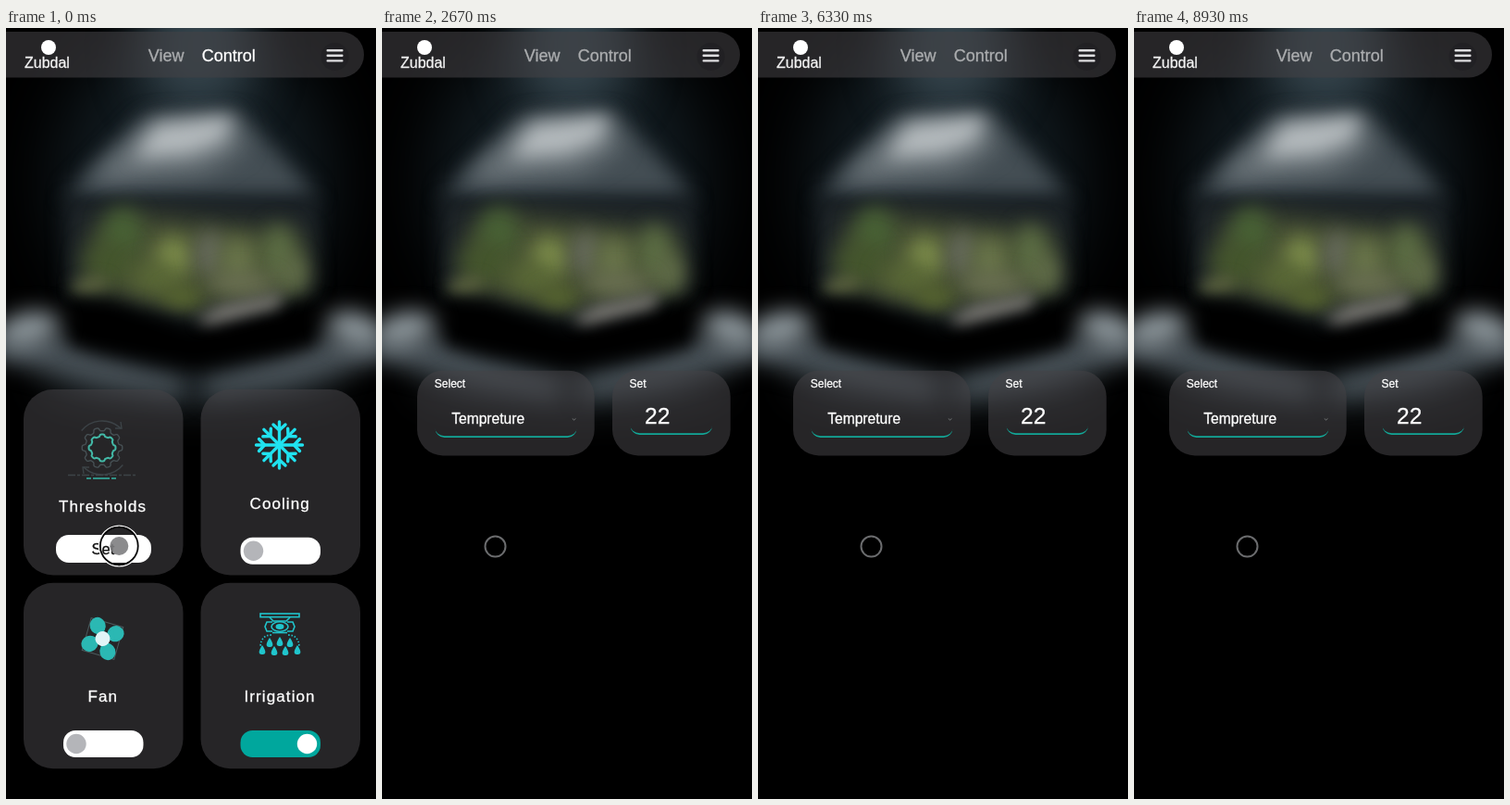
An HTML page with a canvas for the animation above (9 s loop, 400 px wide and 832 px high).

```html
<!DOCTYPE html>
<html lang="en">
<head>
<meta charset="utf-8">
<title>Greenhouse control</title>
<style>
  html, body { margin: 0; width: 100%; height: 100%; overflow: hidden; background: #000; }
  canvas { display: block; width: 100%; height: 100%; }
</style>
</head>
<body>
<canvas id="stage" width="400" height="832"></canvas>
<script>
const W = 400, H = 832, LOOP = 9000, PAGE_CHANGE = 1270;
const FONT = '"Liberation Sans", Arial, sans-serif';
const TEAL = '#2bb8b3', CYAN = '#20e2ef', GLASS = 'rgba(68,65,70,0.57)', MUTED = '#abadaf';
const ctx = document.getElementById('stage').getContext('2d');

function layer(paint) {
  const c = document.createElement('canvas');
  c.width = W;
  c.height = H;
  paint(c.getContext('2d'));
  return c;
}

function fillBox(g, x, y, w, h, r, color) {
  g.fillStyle = color;
  g.beginPath();
  g.roundRect(x, y, w, h, r);
  g.fill();
}

function disc(g, x, y, r, color) {
  g.fillStyle = color;
  g.beginPath();
  g.arc(x, y, r, 0, Math.PI * 2);
  g.fill();
}

function ring(g, x, y, r, color, width) {
  g.strokeStyle = color;
  g.lineWidth = width;
  g.beginPath();
  g.arc(x, y, r, 0, Math.PI * 2);
  g.stroke();
}

function line(g, ...p) {
  g.beginPath();
  for (let i = 0; i < p.length; i += 2) g.lineTo(p[i], p[i + 1]);
  g.stroke();
}

function label(g, text, x, y, size, color, spacing = 0) {
  g.font = `${size}px ${FONT}`;
  g.letterSpacing = spacing + 'px';
  g.fillStyle = g.strokeStyle = color;
  g.lineWidth = 0.3;
  g.fillText(text, x, y);
  g.strokeText(text, x, y);
}

// Soft-focus greenhouse
function paintScene(g) {
  const poly = (color, blur, ...p) => {
    g.filter = `blur(${blur}px)`;
    g.fillStyle = color;
    g.beginPath();
    for (let i = 0; i < p.length; i += 2) g.lineTo(p[i], p[i + 1]);
    g.fill();
  };
  const blob = (color, blur, x, y, rx, ry, turn = 0) => {
    g.filter = `blur(${blur}px)`;
    g.fillStyle = color;
    g.beginPath();
    g.ellipse(x, y, rx, ry, turn, 0, Math.PI * 2);
    g.fill();
  };
  g.fillStyle = '#000';
  g.fillRect(0, 0, W, H);
  blob('#111a1f', 36, 203, 165, 150, 165);
  blob('#34434b', 26, 207, 20, 62, 75);

  // floor and its side lights
  blob('#20272b', 20, 203, 378, 165, 32);
  poly('#485157', 12, -20, 330, 60, 330, 105, 352, 190, 378, 190, 400, 110, 388, -20, 356);
  poly('#485157', 12, 420, 330, 345, 330, 300, 352, 216, 378, 216, 400, 300, 388, 420, 356);

  // roof
  poly('#444e54', 11, 148, 96, 257, 94, 338, 182, 62, 182);
  poly('#6d767b', 12, 160, 98, 245, 95, 258, 130, 215, 155, 88, 166);
  poly('#b4babd', 10, 162, 105, 247, 95, 234, 122, 198, 136, 138, 140);

  // walls and plants
  poly('#1d2327', 10, 64, 186, 338, 186, 333, 285, 207, 322, 66, 288);
  poly('#464f33', 14, 95, 212, 140, 200, 320, 222, 328, 282, 205, 304, 85, 284);
  blob('#486235', 11, 126, 220, 20, 26);
  blob('#44562c', 12, 112, 252, 28, 20);
  blob('#7f8f4c', 11, 181, 247, 20, 22);
  blob('#5a6936', 12, 162, 270, 28, 18);
  blob('#64685a', 10, 220, 243, 16, 25);
  blob('#69754a', 11, 251, 250, 20, 25);
  blob('#5d6f45', 11, 295, 242, 16, 30);
  blob('#616d49', 10, 310, 265, 14, 20);
  blob('#646b43', 8, 90, 278, 20, 7, -.15);
  blob('#55632f', 9, 190, 290, 22, 12);
  blob('#6b7053', 10, 255, 276, 38, 12);

  // planter and its lit edge
  poly('#000', 10, 62, 298, 110, 294, 200, 324, 340, 298, 334, 342, 204, 370, 70, 342);
  poly('#86837e', 8, 206, 315, 234, 300, 300, 287, 294, 301, 218, 320);

  blob('#8d979c', 12, 24, 325, 34, 18, -.25);
  blob('#8d979c', 12, 378, 325, 32, 18, .3);
  g.filter = 'none';
}

function paintHeader(g, activeColor) {
  fillBox(g, -40, 4, 427, 49.5, 25, GLASS);
  disc(g, 46, 21, 8, '#fff');
  label(g, 'Zubdal', 20, 43, 16, '#f2f2f2');
  label(g, 'View', 153.7, 35.7, 18, MUTED);
  label(g, 'Control', 211.7, 35.7, 18, activeColor);
  disc(g, 355.5, 31, 15, 'rgba(20,20,22,0.22)');
  for (const y of [23, 28.6, 34.2]) fillBox(g, 346.5, y, 18, 2.4, 1, '#dedee0');
}

function paintGear(g) {
  g.save();
  g.translate(104, 453);
  const cog = (r, depth, teeth) => {
    g.beginPath();
    for (let i = 0; i <= 180; i++) {
      const a = i / 180 * Math.PI * 2;
      const d = r + depth * Math.tanh(2.5 * Math.cos(a * teeth));
      g.lineTo(d * Math.cos(a), d * Math.sin(a));
    }
    g.stroke();
  };
  g.strokeStyle = '#465054';
  g.lineWidth = 1.4;
  cog(20, 1.8, 10);
  g.strokeStyle = '#43b9a7';
  g.lineWidth = 2;
  cog(13.4, 1.1, 8);
  g.strokeStyle = '#3c4347';
  g.lineWidth = 1.4;
  for (const turn of [0, Math.PI]) {
    g.save();
    g.rotate(turn);
    g.beginPath();
    g.arc(0, 0, 29, -2.45, -0.8);
    g.stroke();
    line(g, 20, -28, 21, -21, 14, -21);
    g.restore();
  }
  g.setLineDash([8, 2, 3, 2]);
  line(g, -37, 29.5, 37, 29.5);
  g.strokeStyle = '#35b7a6';
  g.setLineDash([5, 2, 18, 2]);
  line(g, -17, 33, 17, 33);
  g.restore();
}

function paintSnowflake(g) {
  g.save();
  g.translate(295.5, 450);
  g.strokeStyle = CYAN;
  g.lineWidth = 3.4;
  g.lineCap = g.lineJoin = 'round';
  for (let i = 0; i < 8; i++) {
    const tip = i % 2 ? 23.5 : 25;
    line(g, 0, 0, 0, -tip);
    if (i % 2) line(g, -6, -19, 0, -13.5, 6, -19);
    else line(g, -6.5, -22, 0, -16, 6.5, -22);
    g.rotate(Math.PI / 4);
  }
  g.restore();
}

function paintFan(g) {
  g.save();
  g.translate(104.5, 659);
  g.rotate(0.28);
  g.strokeStyle = '#4b5a5d';
  g.lineWidth = 1;
  g.strokeRect(-18, -18, 36, 36);
  for (let i = 0; i < 4; i++) {
    g.fillStyle = TEAL;
    g.beginPath();
    g.ellipse(-9, -12, 8.5, 9.2, -0.6, 0, Math.PI * 2);
    g.fill();
    g.beginPath();
    g.moveTo(-16, -8);
    g.lineTo(0, 0);
    g.lineTo(-1, -13);
    g.fill();
    g.rotate(Math.PI / 2);
  }
  disc(g, 0, 0, 8, '#e2f5f7');
  g.restore();
}

function paintSprinkler(g) {
  g.save();
  g.translate(296, 0);
  g.strokeStyle = g.fillStyle = '#20c5cc';
  g.lineWidth = 1.6;
  g.strokeRect(-21, 632, 42, 3.6);
  line(g, -11, 636, -7, 640, 7, 640, 11, 636);
  g.beginPath();
  g.ellipse(0, 646, 9, 5.2, 0, 0, Math.PI * 2);
  g.stroke();
  g.beginPath();
  g.ellipse(0, 646, 4.5, 3, 0, 0, Math.PI * 2);
  g.fill();
  line(g, -8, 652.5, 8, 652.5);
  for (const side of [-1, 1]) {
    line(g, side * 8, 641, side * 14, 641, side * 16, 646, side * 14, 651, side * 8, 651);
    g.setLineDash([1.6, 1.8]);
    g.beginPath();
    g.moveTo(side * 9, 655);
    g.quadraticCurveTo(side * 20, 655, side * 21, 667);
    g.stroke();
    g.setLineDash([]);
  }
  for (const [x, y] of [[-19, 672], [-11, 664], [-6, 673], [0, 663], [6, 673], [11, 664], [19, 672]]) {
    g.beginPath();
    g.moveTo(x, y - 6);
    g.bezierCurveTo(x + 6, y + 3, x + 2.5, y + 4, x, y + 4);
    g.bezierCurveTo(x - 2.5, y + 4, x - 6, y + 3, x, y - 6);
    g.fill();
  }
  g.restore();
}

function paintSwitch(g, x, y, on) {
  fillBox(g, x, y, 86.5, 29, 13, on ? '#00a79d' : '#fff');
  disc(g, x + (on ? 72 : 14), y + 14.5, 10.7, on ? '#fff' : '#b4b5b9');
}

function paintControls(g) {
  g.drawImage(scene, 0, 0);
  paintHeader(g, '#fff');
  for (const x of [19, 210.5])
    for (const y of [390, 598.7]) fillBox(g, x, y, 172.5, 200.5, 32, GLASS);
  paintGear(g);
  paintSnowflake(g);
  paintFan(g);
  paintSprinkler(g);
  label(g, 'Thresholds', 57, 522, 17, '#fff', 1.1);
  label(g, 'Cooling', 263.5, 519, 17, '#fff', 1.1);
  label(g, 'Fan', 88.5, 727, 17, '#fff', 1.1);
  label(g, 'Irrigation', 257.5, 727, 17, '#fff', 1.1);
  fillBox(g, 54, 547, 103, 30, 14, '#fff');
  label(g, 'Set', 92.5, 567.5, 16.5, '#111');
  paintSwitch(g, 253.5, 549.8, false);
  paintSwitch(g, 62, 758, false);
  paintSwitch(g, 253.5, 758, true);
}

// Bottom border that thins out around rounded corners
function underline(g, x, y, w) {
  const r = 10, t = 1.8, q = Math.PI / 2;
  g.fillStyle = '#12a797';
  g.beginPath();
  g.arc(x + w - r, y - r, r, 0, q);
  g.arc(x + r, y - r, r, q, 2 * q);
  g.ellipse(x + r, y - r, r, r - t, 0, 2 * q, q, true);
  g.ellipse(x + w - r, y - r, r, r - t, 0, q, 0, true);
  g.fill();
}

function paintThresholds(g) {
  g.drawImage(scene, 0, 0);
  paintHeader(g, MUTED);
  fillBox(g, 38, 369.7, 191.7, 91.7, 28, GLASS);
  fillBox(g, 249, 369.7, 127.7, 91.7, 28, GLASS);
  label(g, 'Select', 56.8, 388, 12, '#fff');
  label(g, 'Set', 267.6, 388, 12, '#fff');
  label(g, 'Tempreture', 75.2, 427, 15.6, '#fff');
  label(g, '22', 284, 427, 24.5, '#fff');
  underline(g, 57.5, 442, 153);
  underline(g, 268.5, 439, 88.5);
  g.strokeStyle = '#77797b';
  g.lineWidth = 1;
  line(g, 205.8, 421.5, 207.6, 423, 209.4, 421.5);
}

function paintPointer(g, t) {
  const p = Math.min(t / 450, 1);
  const ease = 1 - (1 - p) ** 3;
  const press = 1 - ease;
  if (press > 0) {
    const r = 11 + 11 * press;
    g.globalAlpha = press;
    disc(g, 122.3, 559, 10, 'rgba(125,125,128,0.9)');
    ring(g, 122.3, 559, r, '#fff', 1.3);
    ring(g, 122.3, 559, r - 1.5, '#050505', 1.8);
  }
  g.globalAlpha = ease;
  ring(g, 122.5, 559.6, 11, '#6b6c6e', 2);
  g.globalAlpha = 1;
}

const scene = layer(paintScene);
const controls = layer(paintControls);
const thresholds = layer(paintThresholds);

function draw() {
  const t = performance.now() % LOOP;
  ctx.drawImage(t < PAGE_CHANGE ? controls : thresholds, 0, 0);
  paintPointer(ctx, t);
  requestAnimationFrame(draw);
}
draw();
</script>
</body>
</html>
```
